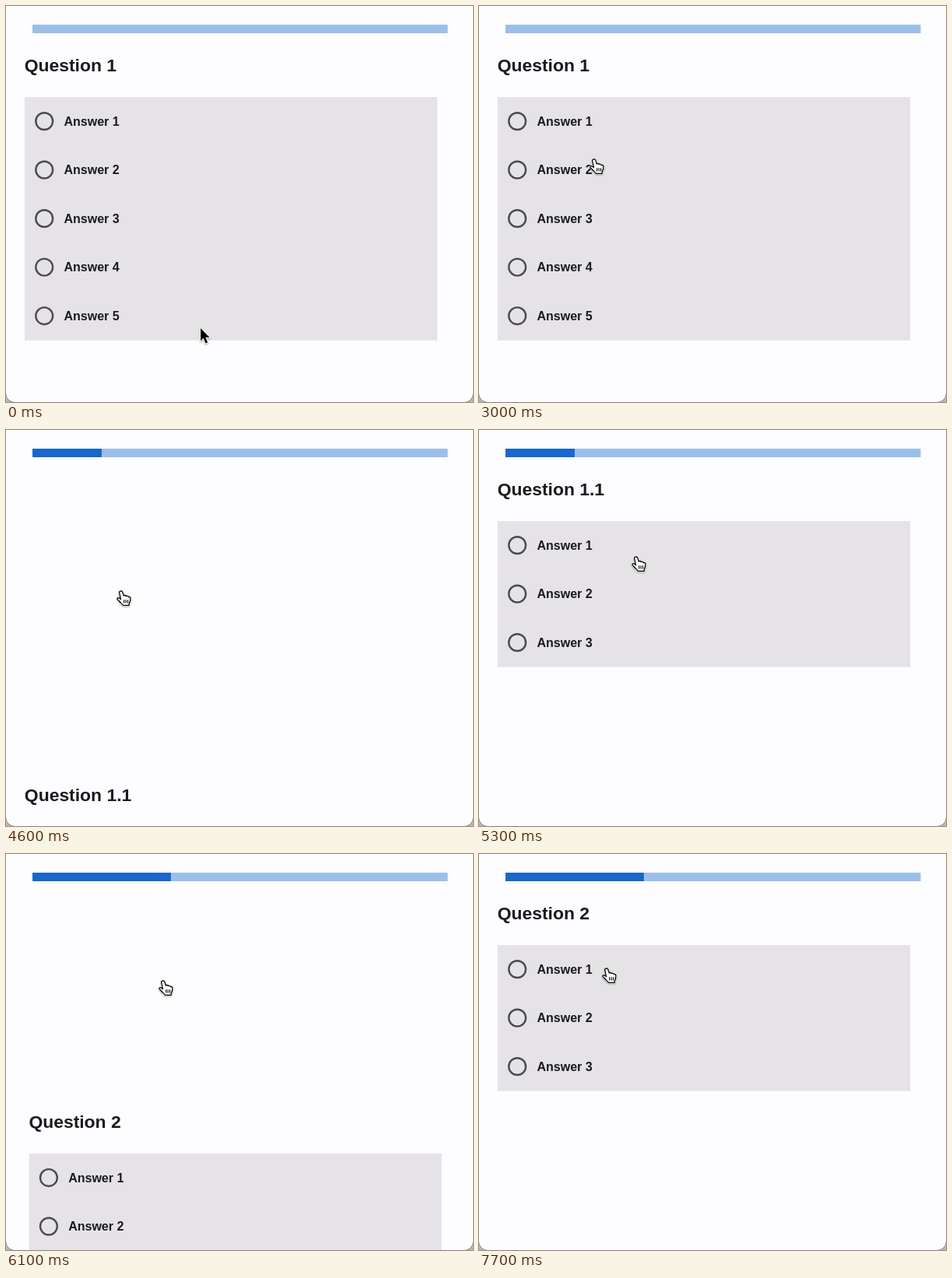
An HTML page with a canvas for the animation above (8 s loop, 600x509 px).

```html
<!DOCTYPE html>
<html lang="en">
<head>
<meta charset="utf-8">
<title>Quiz with follow-up questions</title>
<style>
  html, body { margin: 0; width: 100%; height: 100%; overflow: hidden; background: #fdfcfe; }
  canvas { display: block; }
  /* lower edge of the window with its rounded corners */
  #edge {
    position: absolute; left: -1px; top: -20px; width: 600px; height: 528px;
    border: 1px solid #6a696b; border-radius: 0 0 12px 12px;
    box-shadow: 0 0 0 20px #b5b4b6; pointer-events: none;
  }
</style>
</head>
<body>
<canvas id="stage" width="600" height="509"></canvas>
<div id="edge"></div>
<script>
const ctx = document.getElementById('stage').getContext('2d');
const LOOP = 8000, STEP = 100;
const FONT = '"Liberation Sans", Arial, sans-serif';
const PANEL = { x: 24, y: 117, w: 530, row: 62.55 };
const BAR = { x: 34, y: 24, w: 533.5, h: 11 };
const SLIDE = { distance: 602, ms: 1000 };

const pages = [
  { title: 'Question 1', rows: 5 },
  { title: 'Question 1.1', rows: 3 },
  { title: 'Question 2', rows: 3 },
];

// Each click shows a ripple on a row, then slides on to the next page.
const clicks = [
  { press: 3580, slide: 3715, x: 150, y: 210, row: 1 },
  { press: 5580, slide: 5705, x: 202, y: 164, row: 0 },
];

// Cursor positions: [time, x, y]
const arrowPath = [[0, 250, 414], [900, 224, 465]];
const handPath = [
  [1700, 208, 411], [1800, 182, 285], [1900, 158, 176], [2000, 158, 176],
  [2400, 151, 149], [2900, 142, 193], [3000, 142, 196], [3400, 142, 206],
  [4900, 142, 206], [5300, 196, 162], [7300, 196, 162], [7500, 182, 168],
  [7700, 158, 146],
];

const arrowShape = new Path2D('M0 0V16.5L3.7 13L6.4 19.6L9.2 18.4L6.5 12H11.5Z');
const handShape = new Path2D(
  'M5 1.2C6.3 .6 7.4 1.3 7.8 2.4L9.3 7C9.8 6.2 12 6.3 12.3 7.6C13 6.9 15 7.1 15.3 8.6' +
  'C16.2 8.1 17.8 8.6 17.9 10.2C18.1 13 17.3 15 16.3 17L16 19.3H8.3C7.6 17.6 5 16.2 3.4 14' +
  'L1.2 11.6C.2 10.2 1.8 9 3.2 9.9L5.5 11.6L3.6 3.2C3.3 2.2 4 1.4 5 1.2Z');
const handLines = new Path2D('M9.7 12.3V16.6M12.1 12.3V16.6M14.5 12.3V16.6');

const clamp = v => Math.min(1, Math.max(0, v));
const easeOut = (v, power) => 1 - (1 - clamp(v)) ** power;
const remaining = t => Math.exp(-8.98 * t ** 0.706);

function along(path, time) {
  const next = path.findIndex(point => point[0] > time);
  if (next < 0) return path[path.length - 1].slice(1);
  const [t0, x0, y0] = path[next - 1], [t1, x1, y1] = path[next];
  const k = (time - t0) / (t1 - t0);
  return [x0 + (x1 - x0) * k, y0 + (y1 - y0) * k];
}

function rect(color, x, y, w, h) {
  ctx.fillStyle = color;
  ctx.fillRect(x, y, w, h);
}

function text(string, size, x, y) {
  ctx.font = `bold ${size}px ${FONT}`;
  ctx.fillStyle = '#1b1a1d';
  ctx.fillText(string, x, y);
}

function drawRipple(click, time) {
  const { x, y, w, row } = PANEL;
  const reach = Math.hypot(x + w - click.x, row / 2);
  ctx.save();
  ctx.beginPath();
  ctx.rect(x, y + click.row * row, w, row);
  ctx.clip();
  ctx.beginPath();
  ctx.arc(click.x, click.y, reach * easeOut((time - click.press) / 450, 2.65), 0, 7);
  ctx.fillStyle = 'rgba(0, 0, 0, .17)';
  ctx.fill();
  ctx.restore();
}

function drawPage(index, dx, dy, time) {
  const { title, rows } = pages[index], click = clicks[index];
  ctx.save();
  ctx.translate(dx, dy);
  text(title, 22.9, 23.7, 84);
  rect('#e5e3e6', PANEL.x, PANEL.y, PANEL.w, rows * PANEL.row);
  if (click && time >= click.press) drawRipple(click, time);
  for (let i = 0; i < rows; i++) {
    const middle = PANEL.y + (i + 0.5) * PANEL.row;
    ctx.beginPath();
    ctx.arc(49.2, middle - 0.2, 10.9, 0, 7);
    ctx.lineWidth = 2.4;
    ctx.strokeStyle = '#4c4b4e';
    ctx.stroke();
    text('Answer ' + (i + 1), 16, 74.5, middle + 5.4);
  }
  ctx.restore();
}

function drawPages(time) {
  const index = clicks.filter(c => time >= c.slide + SLIDE.ms).length;
  const click = clicks[index];
  if (!click || time < click.slide) return drawPage(index, 0, 0, time);
  // The entering page sits below the leaving one until that is removed.
  const dx = SLIDE.distance * remaining((time - click.slide) / SLIDE.ms);
  drawPage(index, dx - SLIDE.distance, 0, time);
  drawPage(index + 1, dx, pages[index].rows * PANEL.row + 80.3, time);
}

function drawBar(time) {
  const done = clicks.reduce((sum, c) => sum + easeOut((time - c.slide - 22) / 250, 1.85), 0);
  rect('#9bbfe9', BAR.x, BAR.y, BAR.w, BAR.h);
  rect('#1867c9', BAR.x, BAR.y, BAR.w * done / 6, BAR.h);
}

function drawCursor(time) {
  const isHand = time >= handPath[0][0];
  const shape = isHand ? handShape : arrowShape;
  ctx.save();
  ctx.translate(...along(isHand ? handPath : arrowPath, time));
  ctx.lineJoin = 'round';
  ctx.save();
  ctx.shadowColor = 'rgba(0, 0, 0, .35)';
  ctx.shadowBlur = 2;
  ctx.shadowOffsetY = 1;
  ctx.strokeStyle = '#fff';
  ctx.lineWidth = 2.2;
  ctx.stroke(shape);
  ctx.restore();
  ctx.fillStyle = isHand ? '#fff' : '#000';
  ctx.fill(shape);
  if (isHand) {
    ctx.strokeStyle = '#000';
    ctx.lineWidth = 1.3;
    ctx.stroke(shape);
    ctx.lineWidth = 1.1;
    ctx.stroke(handLines);
  }
  ctx.restore();
}

function draw(now) {
  const time = Math.floor(now % LOOP / STEP) * STEP;
  rect('#fdfcfe', 0, 0, 600, 509);
  drawPages(time);
  drawBar(time);
  drawCursor(time);
  requestAnimationFrame(draw);
}
draw(0);
</script>
</body>
</html>
```
